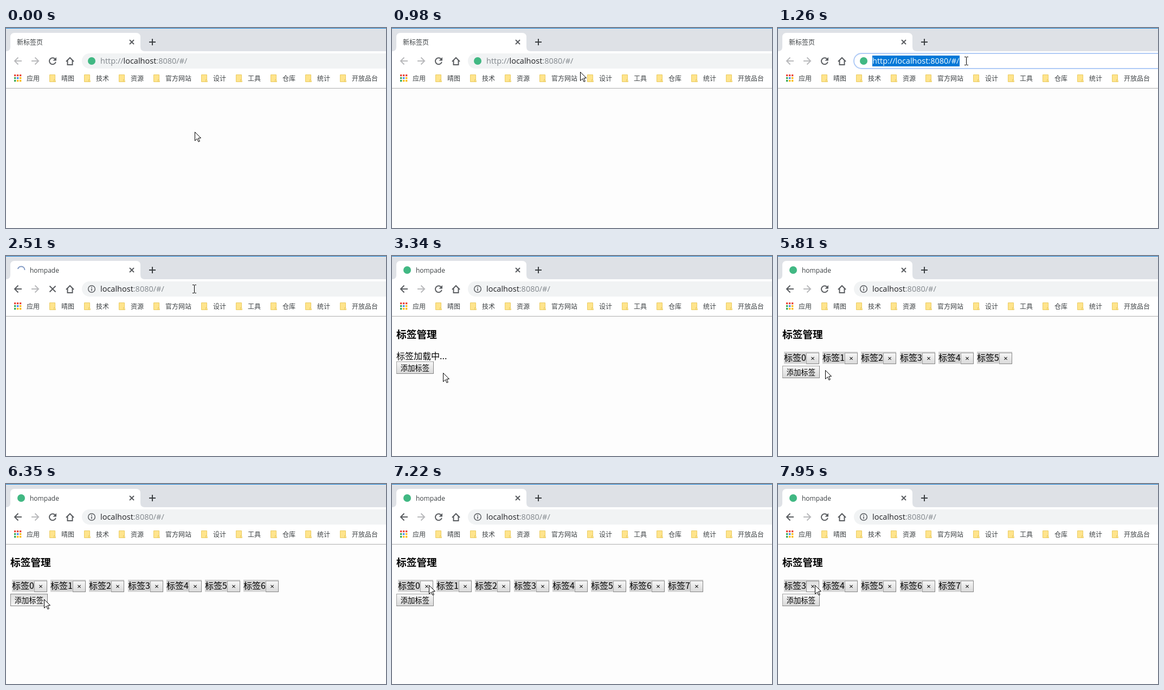
Recreate the animation shown at these times as an HTML page. Size 701 px wide and 370 px high, loop 8000 ms.

```html
<!DOCTYPE html>
<html lang="zh-CN">
<head>
<meta charset="utf-8">
<style>
  html, body { margin: 0; width: 100%; height: 100%; overflow: hidden; background: #fdfdfd; }
  svg { display: block; }
  text { font: 12px "Noto Sans CJK SC", "Noto Sans CJK", sans-serif; fill: #3c4043; white-space: pre; }
  .latin { font-family: "Open Sans", "Noto Sans", sans-serif; }
  .url { font-size: 14.5px; fill: #80868b; }
  .url .host { fill: #202124; }
  #urlSelected text { fill: #fff; }
  .page text { font-size: 16px; fill: #000; }
  .page .heading { font-size: 18.72px; font-weight: 700; }
  .page .caption { font-size: 13.33px; }
  .line { fill: none; stroke: #5a5d61; stroke-width: 2; }
  .button { fill: url(#normal); stroke: #a3a3a3; }
  .button.hover { fill: url(#hover); }
  .button.pressed { fill: url(#pressed); stroke: #8a8a8a; }
  .edge { fill: none; stroke: #858585; }
</style>
</head>
<body>
<svg width="701" height="370" viewBox="0 0 701 370">
  <defs>
    <linearGradient id="normal" x2="0" y2="1"><stop stop-color="#f7f7f7"/><stop offset="1" stop-color="#d9d9d9"/></linearGradient>
    <linearGradient id="hover" x2="0" y2="1"><stop stop-color="#fcfcfc"/><stop offset="1" stop-color="#e4e4e4"/></linearGradient>
    <linearGradient id="pressed" x2="0" y2="1"><stop stop-color="#dedede"/><stop offset="1" stop-color="#f4f4f4"/></linearGradient>
  </defs>

  <!-- tab strip -->
  <rect width="701" height="43" fill="#dee1e6"/>
  <rect width="701" height="1" fill="#1883d7"/>
  <rect y="43" width="701" height="68" fill="#fff"/>
  <path d="M0 43Q8 43 8 35V17Q8 9 16 9H240Q248 9 248 17V35Q248 43 256 43Z" fill="#fff"/>
  <path class="line" stroke-width="1.7" d="M228 22l8 8m0-8l-8 8"/>
  <path class="line" style="stroke:#3c4043" d="M264 26h12m-6-6v12"/>
  <text id="newTab" x="20" y="30.5">新标签页</text>
  <text id="siteTitle" class="latin" x="44" y="30.5">hompade</text>
  <circle id="tabIcon" cx="28" cy="26" r="7" fill="#41b883"/>
  <path id="spinner" class="line" style="stroke:#8199c4" d="M21.8 24A6.5 6.5 0 0 1 34.5 26"/>

  <!-- toolbar -->
  <path id="back" class="line" d="M29 61H16m6.5-6.5L16 61l6.5 6.5"/>
  <path class="line" style="stroke:#b9babc" d="M47 61h13m-6.500-6.500L60 61l-6.500 6.500"/>
  <g id="reload">
    <path class="line" d="M90.500 57.200A6 6 0 1 0 91.800 62.800"/>
    <path d="M93 54v6.500h-6.500z" fill="#5a5d61"/>
  </g>
  <path id="stop" class="line" d="M80.500 55.500l11 11m0-11l-11 11"/>
  <path class="line" d="M111 62l7-7 7 7M113.500 60v8h9v-8"/>
  <rect id="omnibox" x="140" y="47" width="600" height="28" rx="14" fill="#f1f3f4"/>
  <rect id="omniboxFocus" x="140" y="47" width="600" height="28" rx="14" fill="#fff" stroke="#b0cbf6" stroke-width="2"/>
  <circle id="addressIcon" cx="158" cy="61" r="7" fill="#41b883"/>
  <g id="info">
    <circle class="line" style="stroke-width:1.5" cx="158" cy="61" r="6.300"/>
    <path class="line" style="stroke-width:1.600" d="M158 60v4.500M158 57v1.700"/>
  </g>
  <text id="urlFull" class="url latin" x="174" y="66">http://<tspan class="host">localhost</tspan>:8080/#/</text>
  <g id="urlSelected">
    <rect x="174" y="51" width="161" height="20" fill="#0078d7"/>
    <text class="url latin" x="174" y="66">http://localhost:8080/#/</text>
  </g>
  <text id="urlShort" class="url latin" x="174" y="66"><tspan class="host">localhost</tspan>:8080/#/</text>

  <!-- bookmarks -->
  <g id="bookmarks"></g>
  <rect y="111" width="701" height="1" fill="#aeaeae"/>

  <!-- page -->
  <g id="page" class="page">
    <text class="heading" x="8" y="151.500">标签管理</text>
    <text id="loading" x="8" y="191">标签加载中...</text>
    <g id="tags"></g>
    <g id="add">
      <rect id="addButton" class="button" x="8.500" y="195.500" width="68" height="22"/>
      <path class="edge" d="M8 217.500H76.500V195"/>
      <text class="caption" x="15.700" y="212">添加标签</text>
    </g>
  </g>

  <!-- pointer -->
  <path id="arrow" d="M.5 .5V16.500L4.500 12.800 7 18.500 9.300 17.500 6.800 11.800 11.500 11.500Z" fill="#fff" stroke="#000"/>
  <path id="beam" d="M-3 -7.500H0M1 -7.500H4M.5 -7V7M-3 7.500H0M1 7.500H4" fill="none" stroke="#000"/>
</svg>
<script>
const LOOP = 8000;
const TAG_PITCH = 71.17;
const $ = id => document.getElementById(id);
const show = (on, ...ids) => ids.forEach(id => $(id).style.display = on ? '' : 'none');
const place = (el, x, y) => el.setAttribute('transform', `translate(${x} ${y})`);

function buildBookmarks() {
  const colors = ['#ea4335', '#ea4335', '#ea4335', '#34a853', '#4285f4', '#fbbc05', '#34a853', '#fbbc05', '#fbbc05'];
  let html = colors.map((color, i) =>
    `<rect x="${15 + i % 3 * 5}" y="${86 + Math.floor(i / 3) * 5}" width="3.300" height="3.300" fill="${color}"/>`).join('');
  let x = 38;
  for (const name of '应用 晴图 技术 资源 官方网站 设计 工具 仓库 统计 开放品台'.split(' ')) {
    if (x > 38) html += `<path d="M${x - 21.5} 86.500h10v9l1 4h-11z" fill="#ffe48c" stroke="#eacb62"/>` +
      `<path d="M${x - 13.5} 99.500v-4h2" fill="none" stroke="#eacb62"/>`;
    html += `<text x="${x}" y="97.500">${name}</text>`;
    x += name.length * 12 + 40;
  }
  $('bookmarks').innerHTML = html;
}

function buildTags() {
  $('tags').innerHTML = Array.from({ length: 8 }, (_, i) => `<g>
    <rect y="177" width="65" height="22.500" fill="#d3d3d3"/>
    <text y="194">标签${i}</text>
    <rect class="button" x="41.500" y="179.500" width="23" height="20"/>
    <path class="edge" d="M41 199.500H64.500V179"/>
    <text class="caption latin" x="53" y="194" text-anchor="middle">×</text></g>`).join('');
}

// start, ms per step, steps, end x, end y
const moves = [
  [470, 87.8, 8, 347, 61],
  [2780, 80, 8, 94, 216],
  [5230, 60, 2, 93, 210],
  [5810, 70, 3, 70, 213],
  [6930, 76, 4, 68, 187]
];

function pointerAt(t) {
  let x = 348, y = 192;
  for (const [start, step, steps, toX, toY] of moves) {
    if (t < start) break;
    const k = Math.min(Math.floor((t - start) / step) + 1, steps) / steps;
    const eased = k * k * (3 - 2 * k);
    x += (toX - x) * eased;
    y += (toY - y) * eased;
  }
  return [Math.round(x), Math.round(y)];
}

function render(t) {
  const within = (from, to) => t >= from && t < to;
  const passed = times => times.filter(time => t >= time).length;

  const visited = t >= 2100, loading = within(2100, 2600), ready = t >= 2600;
  const focused = within(1172, 2100), selected = within(1260, 2100);
  show(!visited, 'newTab', 'addressIcon');
  show(visited, 'siteTitle', 'info', 'urlShort');
  show(loading, 'spinner', 'stop');
  show(!loading, 'reload');
  show(ready, 'tabIcon', 'page');
  show(!focused, 'omnibox');
  show(focused, 'omniboxFocus');
  show(!visited && !selected, 'urlFull');
  show(selected, 'urlSelected');
  $('back').style.stroke = visited ? '' : '#b9babc';
  const turn = (Math.floor((t - 2100) / 82) - 5) * 20;
  $('spinner').setAttribute('transform', `rotate(${turn} 28 26)`);

  const listed = t >= 4490;
  show(!listed, 'loading');
  show(listed, 'tags');
  place($('add'), 0, listed ? 8 : 0);
  const adding = within(6110, 6200) || within(6350, 6440);
  $('addButton').setAttribute('class', 'button ' + (adding ? 'pressed' : within(5880, 6930) ? 'hover' : ''));

  const first = passed([7310, 7730, 7880]), end = 6 + passed([6200, 6440]);
  const removing = within(7234, 7310) || within(7650, 7730) || within(7800, 7880) || t >= 7950;
  [...$('tags').children].forEach((tag, i) => {
    tag.style.display = i >= first && i < end ? '' : 'none';
    place(tag, 11 + Math.round((i - first) * TAG_PITCH), 0);
    const state = i !== first ? '' : removing ? 'pressed' : t >= 7158 ? 'hover' : '';
    tag.querySelector('.button').setAttribute('class', 'button ' + state);
  });

  const [x, y] = pointerAt(t);
  const overAddress = y >= 47 && y < 75;
  show(overAddress, 'beam');
  show(!overAddress, 'arrow');
  place($('beam'), x, y);
  place($('arrow'), x, y);
}

buildBookmarks();
buildTags();
function tick() {
  render(performance.now() % LOOP);
  requestAnimationFrame(tick);
}
tick();
</script>
</body>
</html>
```
